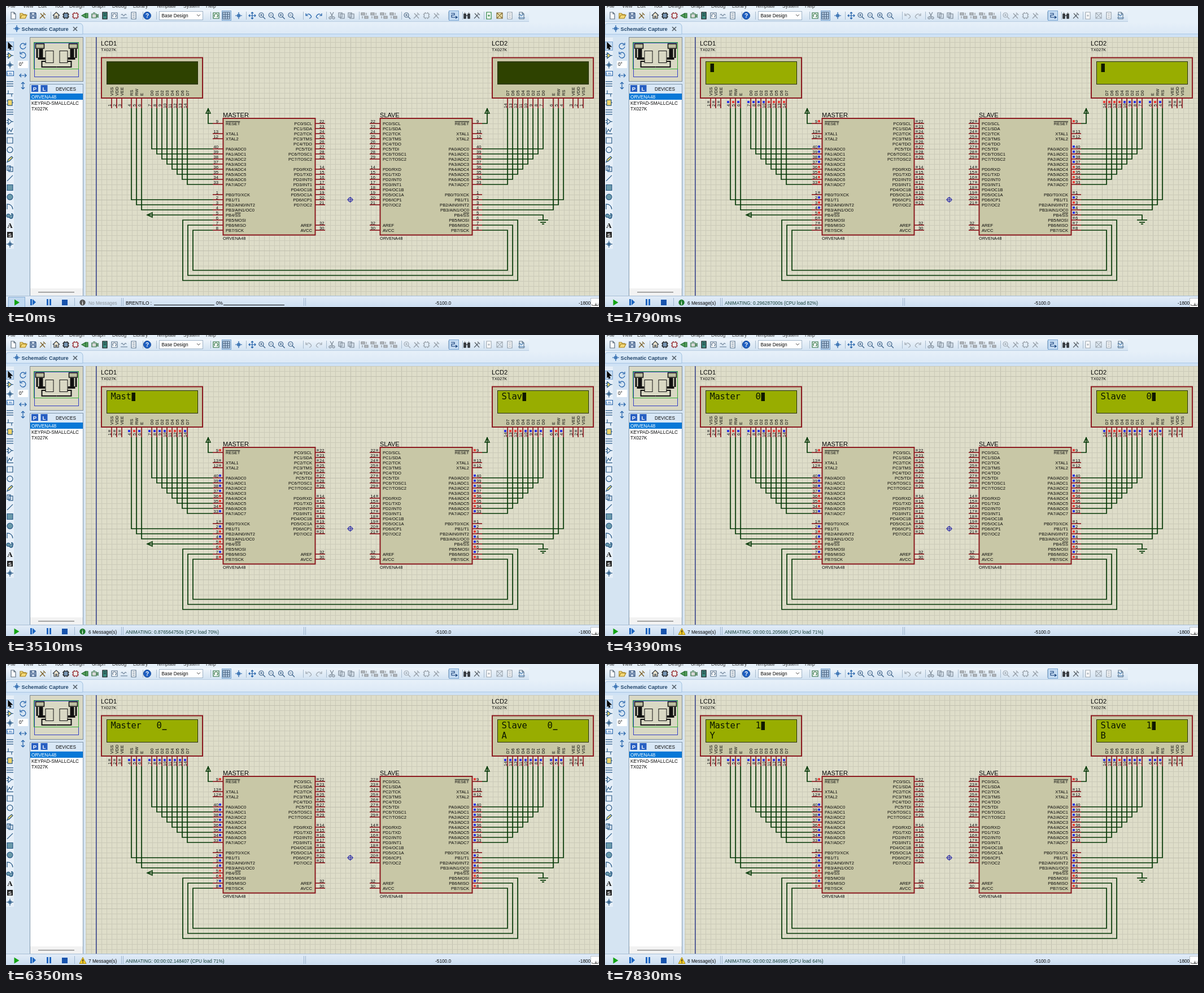
An HTML page with a canvas that plays this animation: 1050 by 533 pixels, repeating every 8 s.

```html
<!DOCTYPE html>
<html lang="en">
<head>
<meta charset="utf-8">
<title>Circuit simulation</title>
<style>
html, body { margin: 0; width: 100%; height: 100%; overflow: hidden; background: #dbe7f3; }
canvas { display: block; width: 100%; height: 100%; }
</style>
</head>
<body>
<canvas id="stage" width="1050" height="533"></canvas>
<script>
const W = 1050, H = 533, LOOP = 8000, LIT_AT = 230, PINS_AT = 310, RUN_AT = 1170;
const SANS = '"Liberation Sans", Arial, sans-serif', MONO = '"DejaVu Sans Mono", monospace';
const WIRE = '#063a08', PIN = '#8c1a20', BODY = '#c8c7a6', INK = '#080808', BLUE = '#1f5fa8', NAVY = '#1d3f70';
const RED = '#e8423c', LOW = '#3038e0', IDLE = '#83837b';
const CHIP = 'ORVENA48', PANEL = 'TX027K';
const stage = document.getElementById('stage').getContext('2d');
let c = stage;

// ---------- drawing helpers ----------
function rect(x, y, w, h, fill, stroke, lw = 1) {
  if (fill) { c.fillStyle = fill; c.fillRect(x, y, w, h); }
  if (stroke) { c.strokeStyle = stroke; c.lineWidth = lw; c.strokeRect(x, y, w, h); }
}
function line(points, color = WIRE, lw = 1.7) {
  c.beginPath();
  for (let i = 0; i < points.length; i += 2) c.lineTo(points[i], points[i + 1]);
  c.strokeStyle = color; c.lineWidth = lw; c.stroke();
}
function text(s, x, y, { size = 8.3, color = INK, align = 'left', weight = '', font = SANS } = {}) {
  c.font = `${weight} ${size}px ${font}`;
  c.textAlign = align; c.fillStyle = color;
  c.fillText(s, x, y);
}
function upText(s, x, y, size = 7.6) {
  c.save(); c.translate(x, y); c.rotate(-Math.PI / 2);
  text(s, 0, 0, { size });
  c.restore();
}
function disc(x, y, r, fill, stroke, lw = 1) {
  c.beginPath(); c.arc(x, y, r, 0, 7);
  if (fill) { c.fillStyle = fill; c.fill(); }
  if (stroke) { c.strokeStyle = stroke; c.lineWidth = lw; c.stroke(); }
}
function shape(d, x, y, stroke, fill, lw = 1.2) {
  const path = new Path2D(d);
  c.save(); c.translate(x, y);
  if (fill) { c.fillStyle = fill; c.fill(path); }
  if (stroke) { c.strokeStyle = stroke; c.lineWidth = lw; c.stroke(path); }
  c.restore();
}
function vGradient(y, h, top, bottom) {
  const g = c.createLinearGradient(0, y, 0, y + h);
  g.addColorStop(0, top); g.addColorStop(1, bottom);
  return g;
}

// ---------- icons, centred on 0,0 ----------
const ICON = {
  doc: 'M-4-6h5l3 3v9h-8zM1-6v3h3', folder: 'M-6 5v-9h4l2 2h4v2M-6 5l3-6h9l-3 6z',
  disk: 'M-5-5h9l1 1v9h-10zM-3-5v4h6v-4M-3 5v-4h6v4', home: 'M-6 0l6-6 6 6M-4-1v6h3v-4h2v4h3v-6',
  chip: 'M-4-4h8v8h-8zM-6-2h2M-6 2h2M4-2h2M4 2h2M-2-6v2M2-6v2M-2 4v2M2 4v2',
  play: 'M-6 0l7-4v8zM1-4h4v8h-4', cam: 'M-5-3h8v7h-8zM3 0l3-2v5l-3-2M-3-5h4',
  book: 'M-4-6h8v12h-8zM-2-3h4M-2 0h4', page: 'M-4-6h8v12h-8zM-2-3h4M-2 0h4M-2 3h4',
  wave: 'M-6 4h12M-5-1q1.5-3 3 0t3 0 3 0', loop: 'M-5-5h10v10h-10zM-2 2a3 3 0 1 1 4 0M2 3v-2',
  grid: 'M-6-6h12v12h-12zM-2-6v12M2-6v12M-6-2h12M-6 2h12',
  cross: 'M-6 0h12M0-6v12M-2-2h4v4h-4z', move: 'M-6 0h12M0-6v12M-2-4l2-2 2 2M-2 4l2 2 2-2M-4-2l-2 2 2 2M4-2l2 2-2 2',
  lens: 'M3-1a4 4 0 1 1-8 0a4 4 0 1 1 8 0M2 2l4 4M-3-1h4', plusLens: 'M3-1a4 4 0 1 1-8 0a4 4 0 1 1 8 0M2 2l4 4M-3-1h4M-1-3v4',
  undo: 'M-5-4v4h4M-5 0q4-5 8-1t-2 6', redo: 'M5-4v4h-4M5 0q-4-5-8-1t2 6',
  cut: 'M-3-6l5 9M3-6l-5 9M-1 4a2 2 0 1 1-4 0a2 2 0 1 1 4 0M5 4a2 2 0 1 1-4 0a2 2 0 1 1 4 0',
  copy: 'M-5-5h6v8h-6zM-2-3h7v8h-7z', block: 'M-6-5h6v4h-6zM0 1h6v4h-6zM3-5v4M-4 1v4',
  tool: 'M-5 5l7-7M1-5l4 4M-4-4l8 9', wire: 'M-5-4h6v3h-5v4h9M3 1l3 2-3 2',
  find: 'M-5-3h3v8h-3zM2-3h3v8h-3zM-2 0h4M-4-5h1M3-5h1',
  plusDoc: 'M-4-6h8v12h-8zM-2 0h4M0-2v4', cancel: 'M-5-5h10v10h-10zM-5-5l10 10M5-5l-10 10',
  pointer: 'M-3-6l7 7h-4l2 4-2 1-1-4-2 2z', gate: 'M-6-2h3M-6 2h3M-3-5l6 5-6 5zM3 0h3',
  bars: 'M-6-4h12M-6 0h12M-6 4h12', bus: 'M-6 1h12M-3-5v6M3 1v5', box: 'M-4-5h8v10h-8zM-6-3h2M-6 3h2M4 0h2',
  graph: 'M-5-6v11h11M-4 3l3-6 3 4 3-6', diag: 'M-5 5l10-10', square: 'M-5-5h10v10h-10z',
  round: 'M5 0a5 5 0 1 1-10 0a5 5 0 1 1 10 0', arc: 'M-5 5v-9q9 0 10 9', pen: 'M-5 5l2-5 6-5 2 2-6 6z',
  blob: 'M0-1a3 3 0 1 0-1 3a3 3 0 1 0 2-3M2-4a3 3 0 1 1 1 6',
  cw: 'M4-3a5 5 0 1 0 1 4M5-6v4h-4', ccw: 'M-4-3a5 5 0 1 1-1 4M-5-6v4h4',
  across: 'M-6 0h12M-3-3l-3 3 3 3M3-3l3 3-3 3', upDown: 'M0-6v12M-3-3l3-3 3 3M-3 3l3 3 3-3'
};
const icon = (name, x, y, color = NAVY, fill) => shape(ICON[name], x, y, color, fill);
function iconRow(names, x, step, color, fill) {
  names.split(' ').forEach((n, i) => icon(n, x + i * step, 17, color, fill));
}

// ---------- application frame ----------
function drawMenus() {
  const items = { File: 3, View: 30, Edit: 57, Tool: 86, Design: 112, Graph: 152, Debug: 188, Library: 225, Template: 266, System: 314, Help: 354 };
  for (const name in items) text(name, items[name], 3, { size: 8.6, color: '#333' });
}
function drawToolbar() {
  rect(0, 0, W, 55, '#e6f0f9');
  rect(0, 7, 926, 20, vGradient(7, 20, '#eff5fb', '#d3e3f2'));
  rect(0, 27, 926, 1, '#b9cde1');
  rect(0, 29, W, 20, vGradient(29, 20, '#e6f0f9', '#dce9f6'));
  drawMenus();
  icon('doc', 13, 17, '#607080', '#fff'); icon('folder', 31, 17, '#a88420', '#f4d978');
  icon('disk', 48, 17, NAVY, '#dce8f8'); icon('tool', 65, 17, '#77591d');
  icon('home', 89, 17, '#303840', '#f1e3c5'); icon('chip', 106, 17, INK, '#7897b5'); icon('chip', 123, 17, '#8c1a20', '#eee');
  icon('play', 140, 17, '#246d30', '#58a060'); icon('cam', 157, 17, '#286b38', '#d8d8d8');
  icon('book', 175, 17, '#111', '#3d8d83'); iconRow('loop wave page', 192, 17, '#59728c', '#fff');
  disc(250, 17, 6.5, '#1e60c2', '#174a98');
  text('?', 250, 20.5, { size: 10, color: '#fff', align: 'center', weight: 'bold' });
  rect(271.5, 9.5, 77, 15, '#fff', '#9eb3c8');
  text('Base Design', 275.5, 20);
  line([338, 15, 341, 18, 344, 15], '#555', 1);
  icon('loop', 372, 17, '#2b7040', '#fff');
  rect(382.5, 8.5, 16, 17, '#c4dbf2', '#77a4d2'); icon('grid', 390, 17, '#405a78');
  icon('cross', 412, 17, BLUE); icon('move', 436, 17, BLUE);
  iconRow('plusLens lens plusLens lens', 453, 17.3, '#395f88', '#edf5fc');
  iconRow('cut copy copy', 577, 17, '#778491'); iconRow('block block block block', 635, 17, '#8d9297', '#b5babf');
  iconRow('tool chip tool', 727, 17.5, '#929ba4');
  rect(784.5, 8.5, 17, 17, '#c4dbf2', '#77a4d2'); icon('wire', 793, 17, '#163f78');
  icon('find', 816, 17, INK, '#525b65'); icon('tool', 834, 17, '#545c64');
  icon('page', 892, 17, '#8c98a4', '#fff'); icon('wave', 913, 17, '#3471ad'); icon('doc', 913, 17, '#6c8094');
  for (const x of [79, 242, 266, 362, 425, 526, 567, 625, 700, 783, 808, 846]) rect(x, 10, 1, 14, '#a6bacd');

  // document tab
  rect(0, 49, W, 6, '#cfe2f5');
  rect(0, 49, W, 1, '#a9c8e6');
  shape('M0 50v-14q0-5 5-5h126q4 0 5 5v14z', 0, 0, '#9fbfdf', '#d9e9f8', 1);
  icon('cross', 19, 40, BLUE);
  text('Schematic Capture', 27.5, 43.5, { size: 9.2, weight: 'bold', color: '#23476d' });
  line([119, 37, 126, 44], '#59646e'); line([126, 37, 119, 44], '#59646e');
}
function drawSidebar() {
  rect(0, 55, 141, 460, '#d5e4f2');
  rect(0, 56, 14, 374, '#e6eff8');
  rect(.5, 63.5, 13, 15, '#c4dbf2', '#77a4d2');
  const modes = 'pointer gate cross - bars bus box bars gate graph square round pen copy diag square round arc blob - - cross'.split(' ');
  const yellow = [1, 6, 7, 12], filled = [15, 16, 18];
  modes.forEach((name, i) => {
    const y = 71 + i * 16.7;
    if (name !== '-') icon(name, 7, y, i ? '#275885' : INK, yellow.includes(i) ? '#f0d467' : filled.includes(i) ? '#6b9aaa' : i ? null : INK);
  });
  rect(1.5, 115.5, 12, 8, '#eef6ff', BLUE); text('LBL', 2, 122, { size: 6, color: BLUE });
  text('A', 7, 393, { size: 13, weight: 'bold', align: 'center', font: '"Liberation Serif", serif' });
  rect(2, 400, 10, 10, '#222'); text('S', 7, 408.5, { size: 9, weight: 'bold', align: 'center', color: '#fff' });
  icon('cw', 30, 71, BLUE); icon('ccw', 30, 87, BLUE);
  rect(21, 97, 18, 13, '#fff'); text('0°', 23, 106);
  icon('across', 30, 123, BLUE); icon('upDown', 30, 141, BLUE);

  // overview
  rect(42.5, 55.5, 94, 78, '#d9d8c4', '#7b8997');
  rect(50.5, 65.5, 78, 60, null, '#3540c4'); rect(49.5, 64.5, 79, 47, null, '#36ab36');
  for (const side of [1, -1]) {
    c.save(); c.translate(89.5, 0); c.scale(side, 1);
    rect(-37, 67, 15, 8, '#bcbca0', '#111', 1.5); rect(-19.5, 79.5, 14, 21, null, '#111');
    rect(-36, 76, 3, 16, '#111'); rect(-31, 76, 7, 15, '#111'); rect(-33, 91, 13, 4, '#111');
    line([-19, 98, -26, 98, -26, 108, 0, 108], '#111', 2);
    c.restore();
  }

  // device list
  rect(42.5, 138.5, 94, 375, '#fff', '#8197ac');
  rect(43, 139, 93, 16, '#d9e8f6');
  for (const [s, x] of [['P', 51], ['L', 67.5]]) {
    rect(x - 6, 140, 12, 12, '#285fc2');
    text(s, x, 149.5, { size: 9.5, weight: 'bold', color: '#fff', align: 'center' });
  }
  text('DEVICES', 88, 149.5, { size: 8.2 });
  rect(43, 155, 93, 11, '#0878d7');
  text(CHIP, 45, 164, { color: '#fff' });
  text('KEYPAD-SMALLCALC', 45, 174.5, { size: 8.2 });
  text(PANEL, 45, 185, { size: 8.2 });
  rect(43, 500, 93, 13, '#f2f2f2'); rect(57, 506, 64, 1.5, '#8b8b8b');
}
function drawStatusFrame() {
  rect(0, 513, W, 20, vGradient(513, 20, '#e3edf8', '#cbddf0'));
  rect(0, 513, W, 1, '#a6bdd4');
  shape('M0 0h3v11h-3zM4 0l6 5.5-6 5.5z', 43, 519, null, '#1c65c0');
  rect(72, 519, 3, 11, '#1c65c0'); rect(77, 519, 3, 11, '#1c65c0');
  rect(99, 520, 10, 10, '#1753ad');
  for (const x of [121, 204, 207, 527, 530]) rect(x, 517, 1, 14, '#9eb5ce');
  text('-5100.0', 760, 528.5); text('-1800', 1014, 528.5);
  rect(1035.5, 517.5, 20, 20, '#fff', '#b8c0c8');
  text('نف', 1049, 531, { size: 10, align: 'right', color: '#444', font: '"DejaVu Sans", sans-serif' });
}

// ---------- schematic ----------
const LEFT_PINS = [], RIGHT_PINS = [];
function pins(list, y, first, step, names) {
  names.split(' ').forEach((name, i) => list.push({ name, num: first + i * step, y: y + 9 * i }));
}
pins(LEFT_PINS, 208, 9, 0, 'RESET');
pins(LEFT_PINS, 226, 13, -1, 'XTAL1 XTAL2');
pins(LEFT_PINS, 253, 40, -1, 'PA0/ADC0 PA1/ADC1 PA2/ADC2 PA3/ADC3 PA4/ADC4 PA5/ADC5 PA6/ADC6 PA7/ADC7');
pins(LEFT_PINS, 334, 1, 1, 'PB0/T0/XCK PB1/T1 PB2/AIN0/INT2 PB3/AIN1/OC0 PB4/SS PB5/MOSI PB6/MISO PB7/SCK');
pins(RIGHT_PINS, 208, 22, 1, 'PC0/SCL PC1/SDA PC2/TCK PC3/TMS PC4/TDO PC5/TDI PC6/TOSC1 PC7/TOSC2');
pins(RIGHT_PINS, 289, 14, 1, 'PD0/RXD PD1/TXD PD2/INT0 PD3/INT1 PD4/OC1B PD5/OC1A PD6/ICP1 PD7/OC2');
pins(RIGHT_PINS, 388, 32, -2, 'AREF AVCC');
const LCD_PINS = 'VSS VDD VEE RS RW E D0 D1 D2 D3 D4 D5 D6 D7'.split(' ');
const lcdPinX = (i, flip) => {
  const dx = i * 9 + (i > 2 ? 8 : 0) + (i > 5 ? 9 : 0);
  return flip ? 1022 - dx : 187 + dx;
};
const MCUS = [
  { x: 384, w: 163, name: 'MASTER', sides: [LEFT_PINS, RIGHT_PINS] },
  { x: 662, w: 163, name: 'SLAVE', sides: [RIGHT_PINS, LEFT_PINS] }
];
const LCDS = [{ x: 168, name: 'LCD1', word: 'Master' }, { x: 860, name: 'LCD2', word: 'Slave', flip: true }];

function drawMcu({ x, w, name, sides }) {
  rect(x + .5, 199, w, 206.5, BODY, PIN, 2);
  text(name, x, 197, { size: 11 });
  text(CHIP, x, 413.5, { size: 7.6 });
  sides.forEach((list, right) => list.forEach(p => {
    const edge = right ? x + w : x, dir = right ? 1 : -1, align = right ? 'right' : 'left';
    const tx = edge - dir * 5;
    line([edge, p.y, edge + dir * 18, p.y], PIN);
    text(p.name, tx, p.y + 3, { size: 7.6, align });
    text(p.num, edge + dir * 8, p.y - 1.5, { size: 7.6, align: right ? 'left' : 'right' });
    const bar = p.name === 'RESET' ? p.name : p.name === 'PB4/SS' ? 'SS' : '';
    if (bar) {
      const full = c.measureText(p.name).width, bw = c.measureText(bar).width;
      rect(right ? tx - bw : tx + full - bw, p.y - 4, bw, .9, INK);
    }
  }));
}
function drawLcd({ x, name, flip }) {
  text(name, x, 70, { size: 11 });
  text(PANEL, x, 80, { size: 7.6 });
  rect(x + 1, 91.5, 179, 71.5, BODY, PIN, 2);
  LCD_PINS.forEach((label, i) => {
    const px = lcdPinX(i, flip);
    line([px, 164, px, 181], PIN);
    upText(label, px + 3, 159);
    upText(i + 1, px - 1.5, i > 8 ? 181 : 178);
  });
}
function drawWires() {
  for (let i = 0; i < 8; i++) {
    line([lcdPinX(6 + i), 181, lcdPinX(6 + i), 253 + 9 * i, 366, 253 + 9 * i]);
    line([lcdPinX(6 + i, true), 181, lcdPinX(6 + i, true), 253 + 9 * i, 843, 253 + 9 * i]);
  }
  for (let i = 0; i < 3; i++) {
    const y = 343 + 9 * i, bus = 379 + 9 * i, low = 486 - 9 * i;
    line([lcdPinX(3 + i), 181, lcdPinX(3 + i), y, 366, y]);
    line([lcdPinX(3 + i, true), 181, lcdPinX(3 + i, true), y, 843, y]);
    line([366, bus, 313 + 9 * i, bus, 313 + 9 * i, low, 906 - 9 * i, low, 906 - 9 * i, bus, 843, bus]);
  }
  line([366, 208, 358, 208, 358, 181]); line([843, 208, 852, 208, 852, 181]);
  for (const x of [358, 852]) shape('M-4 9l4-8 4 8z', x, 181, WIRE, null, 1.5);
  line([366, 370, 250, 370]);
  shape('M9-4l-9 4 9 4z', 250, 370, WIRE, null, 1.5);
  line([843, 370, 951, 370, 951, 379]);
  [[9, 379], [5, 383], [2, 386]].forEach(([r, y]) => line([951 - r, y, 951 + r, y]));
}
function drawSchematic() {
  rect(141, 55, 909, 458, '#deddc9');
  const shade = i => i % 10 === 2 ? '#c0bfae' : '#cbcab8';
  for (let x = 142, i = 0; x < W; x += 9, i++) rect(x, 55, 1, 458, shade(i));
  for (let y = 55, i = 0; y < 513; y += 9, i++) rect(141, y, 909, 1, shade(i));
  rect(140, 55, 1, 458, '#7e8d9b');
  rect(159, 55, 1.5, 458, '#34418e');
  drawWires();
  LCDS.forEach(drawLcd);
  MCUS.forEach(drawMcu);
  disc(609.5, 343, 3.5, null, '#2424a8', 1.2);
  line([604, 343, 615, 343], '#2424a8', 1); line([609.5, 338, 609.5, 348], '#2424a8', 1);
}

// ---------- simulation ----------
// real ms, simulated s, CPU load %
const CLOCK = [[1170, .05, 76], [1790, .296287, 82], [3510, .87656475, 70], [4390, 1.205686, 71],
  [5260, 1.540803, 70], [6350, 2.148407, 71], [7830, 2.846985, 64]];
function simulate(t) {
  if (t < RUN_AT) return { sim: 0, load: 0 };
  let i = CLOCK.length - 1;
  while (CLOCK[i][0] > t) i--;
  const [t0, s0, load] = CLOCK[i], next = CLOCK[i + 1];
  if (!next) return { sim: s0, load };
  const steps = Math.round((next[1] - s0) / .05);
  const k = Math.floor((t - t0) / (next[0] - t0) * steps) / steps;
  return { sim: s0 + (next[1] - s0) * k, load };
}
function signals(t, sim) {
  if (t < RUN_AT) return () => IDLE;
  const busy = sim < 1.25, data = sim < .6 ? 15 : busy ? 7 : sim > 2.5 ? 1 : 0;
  const bit = on => on ? RED : LOW;
  return (name, slave) => {
    const port = /^(?:PA|D)(\d)/.exec(name);
    if (port) return bit(port[1] > 3 && data >> (port[1] - 4) & 1);
    if (name === 'RESET') return RED;
    if (name === 'RW' || name.startsWith('PB2')) return bit(busy);
    if (name === 'RS' || name === 'E' || /^PB[13]/.test(name)) return LOW;
    if (name === 'PB4/SS') return bit(!slave);
    if (/^PB[567]/.test(name)) return sim < .6 ? IDLE : bit(name === 'PB5/MOSI' || name === 'PB7/SCK' && (slave || sim < 1.5 || sim > 2.4));
    return IDLE;
  };
}
function drawPinStates(t, sim) {
  const color = signals(t, sim);
  const dot = (x, y, fill) => rect(x, y, 4, 4, fill);
  LCDS.forEach(({ flip }) => LCD_PINS.forEach((name, i) => dot(lcdPinX(i, flip) - 6, 168, color(name, flip))));
  MCUS.forEach(({ x, w, sides }, slave) => sides.forEach((list, right) => list.forEach(p => {
    if (p.name[0] !== 'A') dot(right ? x + w + 3 : x - 7, p.y - 6, color(p.name, slave));
  })));
}
function drawScreens(t, sim) {
  LCDS.forEach(({ x, word, flip }) => {
    rect(x + 10.5, 98.5, 161, 40, t < LIT_AT ? '#2e4200' : '#98ad00', '#26300a');
    if (t < RUN_AT) return;
    const cell = (ch, col, row) => text(ch, x + 17.5 + col * 9, 114 + row * 18, { size: 15.5, font: MONO, color: '#0a1600' });
    const typed = Math.max(0, Math.min(10, Math.floor((sim - .68) / .05) + 1));
    const line1 = word.padEnd(9) + (sim > 2.55 ? 1 : 0);
    [...line1.slice(0, typed)].forEach((ch, i) => cell(ch, i, 0));
    const reply = sim > 2.5 ? (flip ? 'B' : 'Y') : sim > 1.3 && flip ? 'A' : '';
    cell(reply, 0, 1);
    const second = sim > 1.25 && sim < 1.35 || sim > 2.45 && sim < 2.55;
    const cx = x + 18.5 + (second ? 0 : typed * 9), cy = second ? 120 : 102;
    const solid = Math.floor(sim / .42) % 2 === 0;
    rect(cx, solid ? cy : cy + 13.5, solid ? 6.5 : 8, solid ? 15 : 1.5, '#101800');
  });
}
function drawMessages(t, sim) {
  const idle = t < LIT_AT, count = sim > 2.4 ? 8 : sim > 1.19 ? 7 : 6;
  if (count > 6) {
    shape('M0-5.5l6 11h-12z', 136, 525, '#a98a16', '#f5cc28', 1);
    rect(135.5, 523, 1.3, 4, INK); rect(135.5, 528, 1.3, 1.3, INK);
  } else {
    disc(135.5, 525, 5.2, idle ? '#555' : '#1c7a2c');
    text('i', 135.5, 528.5, { size: 9, weight: 'bold', color: '#fff', align: 'center' });
  }
  text(idle ? 'No Messages' : `${count} Message(s)`, 146, 528.5, { color: idle ? '#8d949b' : INK });
}
function drawStatus(t, sim, load) {
  if (t < LIT_AT) rect(4.5, 515.5, 29, 18, '#c0d8f0', '#86add4');
  shape('M0 0l9 5.5-9 5.5z', t < LIT_AT ? 15 : 14.5, 519.5, null, '#12a312');
  drawMessages(t, sim);
  if (t < LIT_AT) {
    text('BRENTILO :', 212, 528.5);
    rect(262, 529, 107, 1, INK); text('0%', 372, 528.5); rect(385, 529, 108, 1, INK);
  } else {
    const clock = sim < 1 ? sim.toFixed(9) + 's' : '00:00:' + sim.toFixed(6).padStart(9, '0');
    text(`ANIMATING: ${clock} (CPU load ${load}%)`, 212, 528.5, { color: '#123d35' });
  }
}
function drawEditTools(t) {
  const on = t < RUN_AT, gray = '#a0a9b2';
  icon('undo', 536, 17, on ? BLUE : gray); icon('redo', 554, 17, on ? BLUE : gray);
  icon('plusLens', 710, 17, on ? '#57708a' : gray);
  icon('plusDoc', 855, 17, on ? '#26813a' : gray, '#fff'); icon('cancel', 874, 17, on ? '#836b34' : gray, on ? '#f1e6b0' : null);
}

const backdrop = document.createElement('canvas');
backdrop.width = W; backdrop.height = H;
c = backdrop.getContext('2d');
drawToolbar(); drawSchematic(); drawSidebar(); drawStatusFrame();
c = stage;

const start = performance.now();
function frame() {
  const t = (performance.now() - start) % LOOP, { sim, load } = simulate(t);
  c.drawImage(backdrop, 0, 0);
  drawEditTools(t);
  drawScreens(t, sim);
  if (t >= PINS_AT) drawPinStates(t, sim);
  drawStatus(t, sim, load);
  requestAnimationFrame(frame);
}
frame();
</script>
</body>
</html>
```
